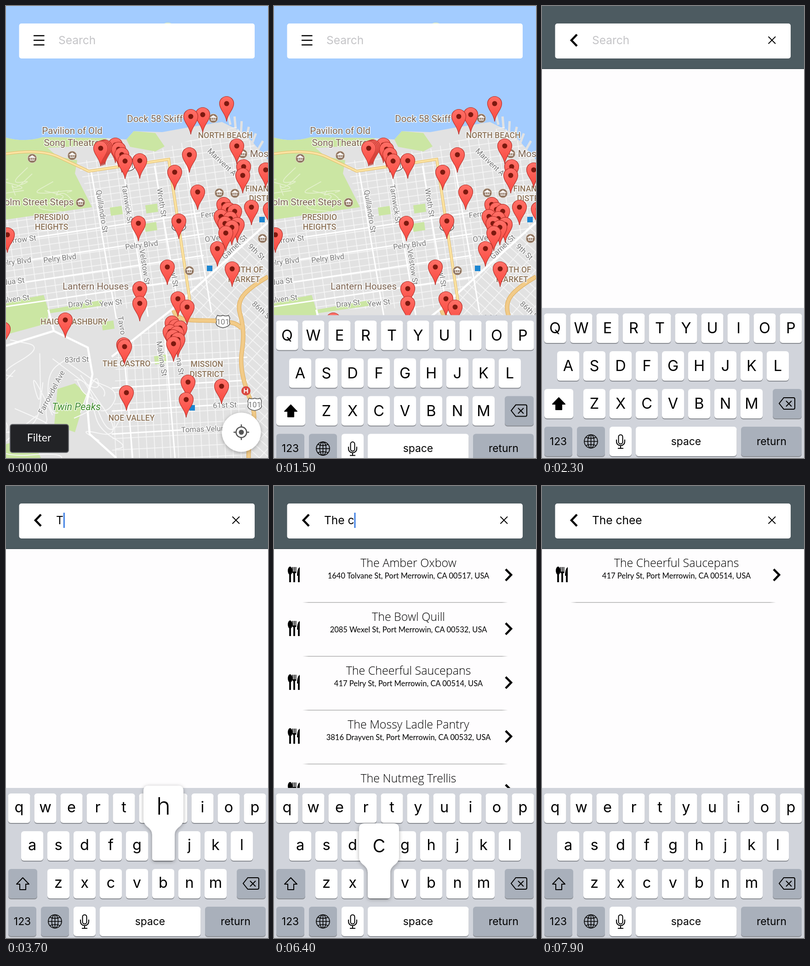
Animation, 570 px wide and 982 px high, one loop 8000 ms. Source, as an HTML page:

```html
<!DOCTYPE html>
<html lang="en">
<head>
<meta charset="utf-8">
<title>Map search</title>
<style>
html, body { margin: 0; width: 100%; height: 100%; overflow: hidden; background: #fff; }
svg { display: block; width: 100vw; height: 100vh; }
text { font-family: Inter, Roboto, sans-serif; white-space: pre; }
.mid { text-anchor: middle; }
.map text { font-family: Roboto, Arial, sans-serif; paint-order: stroke; stroke: #fff; stroke-width: 3px; stroke-linejoin: round; stroke-opacity: .85; }
.street { font-size: 16.5px; fill: #777; }
.area { font-size: 17.5px; font-weight: 500; fill: #8c7358; }
.poi { font-size: 20.5px; fill: #7c6350; }
.peak { font-size: 21.5px; font-style: italic; fill: #3d8b2b; }
.name { font: 300 25px "Open Sans", "Noto Sans", sans-serif; }
.address { font: 16.5px Lato, "Noto Sans", sans-serif; }
.filter { font: 23px Lato, "Noto Sans", sans-serif; fill: #fff; }
.field { font-size: 24.5px; }
.hint { fill: #c4c4c7; }
.key { font-size: 32.5px; }
.word { font-size: 22.8px; }
.big { font-size: 52px; font-weight: 300; }
.line { fill: none; stroke: #000; stroke-width: 2px; }
</style>
</head>
<body>
<svg id="stage" viewBox="0 0 570 982" preserveAspectRatio="none"></svg>
<script>
const times = (n, f) => Array.from({ length: n }, (_, i) => f(i));
const clamp = v => Math.max(0, Math.min(1, v));
const text = (s, x, y, cls, turn = 0) =>
  `<text class="mid ${cls}" dy=".35em" transform="translate(${x} ${y}) rotate(${turn})">${s}</text>`;
const stroke = (d, color, width) => `<path d="${d}" fill="none" stroke="${color}" stroke-width="${width}"/>`;
const fill = (d, color) => `<path d="${d}" fill="${color}"/>`;
const rect = (x, y, w, h, color, r = 0, id = '') =>
  `<rect id="${id}" x="${x}" y="${y}" width="${w}" height="${h}" rx="${r}" fill="${color}"/>`;

let seed = 11;
const random = () => (seed = seed * 16807 % 2147483647) / 2147483647;

const grid = (id, w, h, turn) => `<pattern id="${id}" width="${w}" height="${h}" patternUnits="userSpaceOnUse"
  patternTransform="rotate(${turn})"><path d="M0 0H${w}M0 0V${h}" stroke="#f8f8f8" stroke-width="3"/></pattern>`;

const defs = `<defs>
  ${grid('north', 21, 15, -8)}${grid('south', 26, 15, 42)}${grid('mission', 17, 25, -3)}
  <linearGradient id="red" x2="0" y2="1"><stop stop-color="#ff7067"/><stop offset="1" stop-color="#f9483f"/></linearGradient>
  <linearGradient id="rule"><stop stop-color="#aaa" stop-opacity="0"/><stop offset=".03" stop-color="#aaa"/>
    <stop offset=".97" stop-color="#aaa"/><stop offset="1" stop-color="#aaa" stop-opacity="0"/></linearGradient>
  <filter id="shade" x="-30%" y="-30%" width="160%" height="160%">
    <feDropShadow dx="0" dy="2" stdDeviation="4" flood-opacity=".32"/></filter>
  <g id="pin"><path d="M0 39C-2 21-15.5 14-15.5 0A15.5 15.5 0 0 1 15.5 0C15.5 14 2 21 0 39Z"
    fill="url(#red)" stroke="#b8322b" stroke-width="1.2"/><circle r="5.5" fill="#7d190f"/></g>
  <g id="spot"><circle r="10" fill="#917763" stroke="#e8ddd0"/>
    <path d="M-6-2L0-6 6-2ZM-5 4H5M-4-1V3M0-1V3M4-1V3" fill="#fff" stroke="#fff" stroke-width="1.3"/></g>
  <clipPath id="listClip"><rect y="137" width="570" height="519"/></clipPath>
</defs>`;

// Map: parallel streets and winding lanes
const parallel = (n, x, y, stepX, stepY, dx, dy) =>
  times(n, i => `M${x + i * stepX} ${y + i * stepY}l${dx} ${dy}`).join('');
const winding = (n, x, y, w, h) => times(n, () =>
  `M${x + random() * w} ${y + random() * h}` + times(3, () => `t${(random() - .5) * w * .6} ${random() * h * .35}`).join('')).join('');

const avenues = parallel(4, 0, 512, 0, 47, 430, -64) + parallel(4, 185, 357, 69, -5, 55, 323) +
  parallel(4, 230, 780, 0, 50, 295, -17) + parallel(2, 256, 745, 88, -50, 24, 290);
const coast = 'M0 286Q40 297 80 285L220 287';
const land = coast + 'L262 290 278 272 340 274 395 264 470 252 520 277 570 334V982H0Z';
const presidio = coast + 'L200 303 90 308 112 327 155 335 150 364 187 437 0 464Z';
const parks = [presidio, 'M262 290L278 272 325 276 345 305 325 316 270 306Z', 'M0 643L82 628 92 660 208 639V651L92 668 88 690 0 714Z',
  'M112 832L150 820 175 843 150 926 105 910Z', 'M0 952L54 935 76 982H0Z'];
const squares = [[240, 445], [317, 440], [315, 480], [222, 694], [336, 768]];
const highway = 'M0 321Q75 310 112 327T180 359L354 333 403 660';
const freeway = 'M365 661C372 690 420 681 455 684S500 687 512 700M570 588C515 620 501 640 509 668S518 720 513 752 517 820 534 862 525 940 528 982';

// Street labels grouped by angle
const streets = {
  '81': [['Quillandro St', 209, 446], ['Tarnwick St', 264, 430], ['Wroth St', 339, 427], ['Velstow St', 302, 567],
    ['Tavro', 252, 694], ['Malvina St', 339, 766], ['na St', 379, 783], ['owl St', 366, 588]],
  '-7': [['Pelry Blvd', 295, 519], ['Pelry Blvd', 117, 548], ['elry Blvd', 24, 555], ['arrow St', 35, 507], ['dua St', 17, 598],
    ['alven St', 22, 636], ['Dray St', 161, 646], ['Yew St', 228, 645], ['Fern', 440, 453], ["O'Ve", 449, 505]],
  '-2': [['83rd St', 154, 768], ['61st St', 476, 867], ['Tomas Velur', 427, 919]],
  '43': [['Marivent A', 470, 339], ['9th St', 545, 534], ['86th St', 557, 662]],
  '-44': [['Garnet St', 497, 523]],
  '-62': [['Farrowdel Ave', 99, 839]]
};
const areas = [['NORTH BEACH', 477, 281], ['PRESIDIO', 99, 459], ['HEIGHTS', 99, 480], ['HAIGHT ASHBURY', 148, 686],
  ['THE CASTRO', 262, 777], ['MISSION', 437, 778], ['DISTRICT', 437, 800], ['NOE VALLEY', 273, 895],
  ['SOUTH OF', 518, 573], ['MARKET', 518, 594], ['FINANCIAL', 565, 397], ['DISTRICT', 566, 418]];
const pois = [['Dock 58 Skiff', 324, 245], ['Pavilion of Old', 144, 271], ['Song Theatre', 143, 297],
  ['olm Street Steps', 72, 426], ['Lantern Houses', 195, 609], ['Moss', 556, 321]];
const labels = (list, cls, turn) => list.map(([s, x, y]) => text(s, x, y, cls, turn)).join('');
const spots = [[57, 331], [144, 325], [451, 244], [515, 321], [464, 406], [498, 407], [162, 427], [558, 505], [399, 575]];
const place = (id, list) => list.map(p => `<use href="#${id}" transform="translate(${p})"/>`).join('');

// Pins: even spirals where crowded, single points elsewhere
const spiral = (n, x, y, rx, ry) => times(n, i => {
  const r = Math.sqrt((i + .5) / n), a = i * 2.4;
  return [x + rx * r * Math.cos(a), y + ry * r * Math.sin(a)];
});
const pins = [
  ...spiral(9, 483, 462, 22, 38), ...spiral(8, 368, 711, 15, 26),
  ...times(4, i => [215 - 3 * i, 306 + i]), ...times(4, i => [238 + 7 * i, 302 + 8 * i + 1.2 * i * i]),
  [480, 212], [428, 236], [402, 240], [502, 304], [399, 323], [291, 336], [517, 349], [565, 356], [367, 361], [515, 368],
  [417, 404], [534, 437], [575, 441], [376, 467], [288, 472], [3, 497], [460, 527], [351, 567], [492, 571], [291, 614],
  [374, 636], [291, 646], [394, 654], [129, 682], [-6, 702], [256, 736], [258, 740], [396, 817], [469, 826], [262, 840], [392, 855]
].sort((a, b) => a[1] - b[1]);

const shield = (x, y) => `<g transform="translate(${x} ${y})"><path d="M-12-13Q-6-10 0-13 6-10 12-13L15-7Q13 0 15 5 13 12 0 14-13 12-15 5-13 0-15-7Z"
  fill="#fff" stroke="#555" stroke-width="1.5"/>${text('101', 0, 1, 'street')}</g>`;
const searchBox = rect(28.5, 38, 512.5, 76, '#fff', 5);

const map = `<g class="map">${rect(0, 0, 570, 982, '#a3ccff')}
  <ellipse cx="352" cy="40" rx="9" ry="4" fill="#dcebc5"/>${fill(land, '#e2e2e2')}
  ${times(7, i => `<rect x="-3" y="-20" width="5" height="27" fill="#e2e2e2"
    transform="translate(${487 + 12.5 * i} ${251 + 8 * i + .8 * i * i}) rotate(${8.7 * i - 14})"/>`).join('')}
  ${fill('M155 338L340 310 500 262 570 334V470L360 655 92 660 0 640V464L187 437Z', 'url(#north)')}
  ${fill('M360 655L570 470V982H535L512 700Z', 'url(#south)')}
  ${fill('M240 752L360 660 505 690 530 982H230Z', 'url(#mission)')}
  ${parks.map(d => fill(d, '#cbe6a3')).join('')}
  ${squares.map(([x, y]) => `<rect x="-13" y="-9" width="26" height="18" fill="#cbe6a3" transform="translate(${x} ${y}) rotate(-8)"/>`).join('')}
  ${stroke(winding(7, 5, 345, 110, 70), '#e3f0cc', 1.8)}
  ${stroke(winding(16, 0, 715, 190, 200), '#f8f8f8', 2)}
  ${stroke(avenues, '#fff', 3)}${stroke('M92 660L104 706 178 742 188 800 176 860 182 930 240 982M104 706L0 738M230 762L360 660 570 470', '#fff', 4.5)}
  ${stroke(highway, '#e5bd69', 6)}${stroke(highway, '#fbe3a2', 4)}
  ${stroke(freeway, '#dfb268', 9.5)}${stroke(freeway, '#f2cb88', 7)}
  ${Object.entries(streets).map(([turn, list]) => labels(list, 'street', turn)).join('')}
  ${labels(areas, 'area')}${labels(pois, 'poi')}${text('Twin Peaks', 153, 870, 'peak')}
  ${place('spot', spots)}
  ${[[551, 458], [437, 564], [399, 867]].map(p => rect(...p, 12, 12, '#1c86d1')).join('')}
  <circle cx="522" cy="836" r="10" fill="#d9473f"/>${stroke('M518.5 831V841M525.5 831V841M518.5 836H525.5', '#fff', 2)}
  ${shield(265, 345)}${shield(376, 476)}${shield(472, 685)}${shield(541, 865)}${place('pin', pins)}</g>
  <rect x="9" y="909" width="127" height="61" rx="5" fill="#222326" stroke="#66686c" stroke-width="2"/>
  <text class="mid filter" x="72" y="946">Filter</text>
  <g transform="translate(512 926)"><circle r="42.5" fill="#fff" filter="url(#shade)"/><circle r="5.5" fill="#555"/>
    <circle r="11.5" fill="none" stroke="#555" stroke-width="2.5"/>${stroke('M0-17V-11M0 11V17M-17 0H-11M11 0H17', '#555', 2.5)}</g>
  ${searchBox}${stroke('M60 64.5h23.5m-23.5 10h23.5m-23.5 10h23.5', '#000', 2.6)}
  <text class="field hint" x="114" y="83">Search</text>`;

// Results
const places = [['The Amber Oxbow', '1640 Tolvane St, Port Merrowin, CA 00517, USA'],
  ['The Bowl Quill', '2085 Wexel St, Port Merrowin, CA 00532, USA'],
  ['The Cheerful Saucepans', '417 Pelry St, Port Merrowin, CA 00514, USA'],
  ['The Mossy Ladle Pantry', '3816 Drayven St, Port Merrowin, CA 00532, USA'],
  ['The Nutmeg Trellis', '530 Yarwin St, Port Merrowin, CA 00514, USA']];
const row = ([name, address], i) => `<g transform="translate(0 ${i * 117})">
  <text class="mid name" x="292.5" y="176">${name}</text><text class="mid address" x="292.5" y="201">${address}</text>
  <ellipse cx="35" cy="184" rx="5" ry="9"/>${stroke('M35 190V209M44 190V209M54 190V209', '#000', 3.8)}
  ${stroke('M40.5 176V189M44 176V189M47.5 176V189', '#000', 1.8)}${fill('M56 176V195H50Q50 180 56 176ZM39.6 186H48.4L44 194Z', '#000')}
  ${stroke('M504 181L516 193 504 205.5', '#000', 4.6)}${rect(62, 252.3, 447, 1.4, 'url(#rule)')}</g>`;

const search = `<g id="search">${rect(0, 0, 570, 982, '#fefdfe')}
  <g clip-path="url(#listClip)"><g id="all">${places.map(row).join('')}</g><g id="one">${row(places[2], 0)}</g></g>
  ${rect(0, 0, 570, 137, '#4d5b61')}${rect(0, 135, 570, 2, '#435055')}${searchBox}
  ${stroke('M76 62L64 74.5 76 87', '#000', 4.6)}${stroke('M492.5 66.5l15.5 15.5m0-15.5l-15.5 15.5', '#000', 1.8)}
  <text id="hint" class="field hint" x="109" y="83">Search</text><text id="typed" class="field" x="109" y="83"></text>
  ${rect(0, 58, 3, 33, '#3f80e4', 0, 'caret')}</g>`;

// Keyboard
const DARK = '#a9b0bb', keyAt = {};
const rowY = i => 668 + 82 * i;
const cap = (x, line, w, color = '#fff', id = '') =>
  rect(x, rowY(line) + 2, w, 64, '#8b8e94', 6) + rect(x, rowY(line), w, 64, color, 6, id);
const word = (s, x) => `<text class="mid word" x="${x}" y="953.5">${s}</text>`;
const letters = ['qwertyuiop', 'asdfghjkl', 'zxcvbnm'].map((s, line) => [...s].map((c, i) => {
  const x = 261 + 57 * (i - (s.length - 1) / 2), y = rowY(line);
  keyAt[c] = [x, y];
  return cap(x, line, 48) + `<text class="mid key letter" x="${x + 24}" y="${y + 43}">${c}</text>`;
}).join('')).join('');

const keyboard = `<g id="keyboard">${rect(0, 656, 570, 327, '#d1d4db')}${letters}
  ${cap(5, 2, 63, DARK, 'shift')}${cap(502, 2, 63, DARK)}${cap(5, 3, 61, DARK)}${cap(76, 3, 61, DARK)}
  ${cap(147, 3, 48)}${cap(204, 3, 219.5, '#fff', 'space')}${cap(433, 3, 132, DARK)}
  <path id="arrow" d="M36.5 851L50 865H43V877H30V865H23Z" stroke="#000" stroke-width="2" stroke-linejoin="round"/>
  <g class="line"><path d="M526 851H547Q550 851 550 854V873Q550 876 547 876H526L516 863.5ZM531 858l12 12m0-12l-12 12"/>
    <g transform="translate(106.5 946)" stroke-width="1.6"><circle r="14.5"/><ellipse rx="7" ry="14.5"/>
      <path d="M-14.5 0H14.5M0-14.5V14.5M-11-9Q0-4 11-9M-11 9Q0 4 11 9"/></g>
    <rect x="166.5" y="931.5" width="9" height="20" rx="4.5"/><path d="M162 942V946C162 958 180 958 180 946V942M171 955V961M165 961H177"/></g>
  ${word('123', 35.5)}${word('space', 313.5)}${word('return', 499.5)}
  <g id="popup"><path filter="url(#shade)" fill="#fff" d="M0 58V7C0-9-19-9-19-27V-87Q-19-99-7-99H56Q68-99 68-87V-27C68-9 49-9 49 7V58Q49 64 43 64H6Q0 64 0 58Z"/>
    <text id="big" class="mid big" x="24.5" y="-36"></text></g></g>`;

document.getElementById('stage').innerHTML = defs + map + search + keyboard;

// Motion: character, press, insert, release (ms)
const presses = [['T', 3200, 3350, 3400], ['h', 3650, 3800, 3850], ['e', 4050, 4200, 4250], [' ', 4920, 5100, 5100],
  ['c', 6250, 6350, 6450], ['h', 6550, 6700, 6700], ['e', 6800, 6950, 6950], ['e', 7100, 7250, 7250]];
const $ = id => document.getElementById(id);
const keyTexts = [...document.querySelectorAll('.letter')];
const show = (id, on) => { $(id).style.display = on ? '' : 'none'; };

function draw(t) {
  const done = presses.filter(p => p[2] <= t);
  const held = presses.find(p => p[1] <= t && t < p[3]);
  const upper = !done.length;

  const slide = 327 * (1 - clamp((t - 1200) / 400)) ** 2.18;
  $('keyboard').setAttribute('transform', `translate(0 ${slide})`);
  $('search').style.opacity = clamp((t - 1600) / 250);
  show('all', t >= 4500 && t < 6800);
  show('one', t >= 6800);

  show('hint', upper);
  $('typed').textContent = done.map(p => p[0]).join('');
  $('caret').setAttribute('x', 109 + (upper ? 0 : $('typed').getComputedTextLength()));
  const beat = (t - (upper ? 1650 : done.at(-1)[2]) + 8000) % 1000;
  $('caret').style.opacity = beat > 750 ? 1 : clamp((550 - beat) / 100);

  for (const k of keyTexts) {
    k.textContent = upper ? k.textContent.toUpperCase() : k.textContent.toLowerCase();
    k.setAttribute('dy', upper ? 0 : -2);
  }
  $('shift').setAttribute('fill', upper ? '#fff' : DARK);
  $('arrow').setAttribute('fill', upper ? '#000' : 'none');
  $('space').setAttribute('fill', held && held[0] === ' ' ? DARK : '#fff');

  const key = held && keyAt[held[0].toLowerCase()];
  show('popup', key);
  if (key) {
    $('popup').setAttribute('transform', `translate(${key})`);
    $('big').textContent = held[0];
  }
}

function tick() {
  draw(performance.now() % 8000);
  requestAnimationFrame(tick);
}
tick();
</script>
</body>
</html>
```
